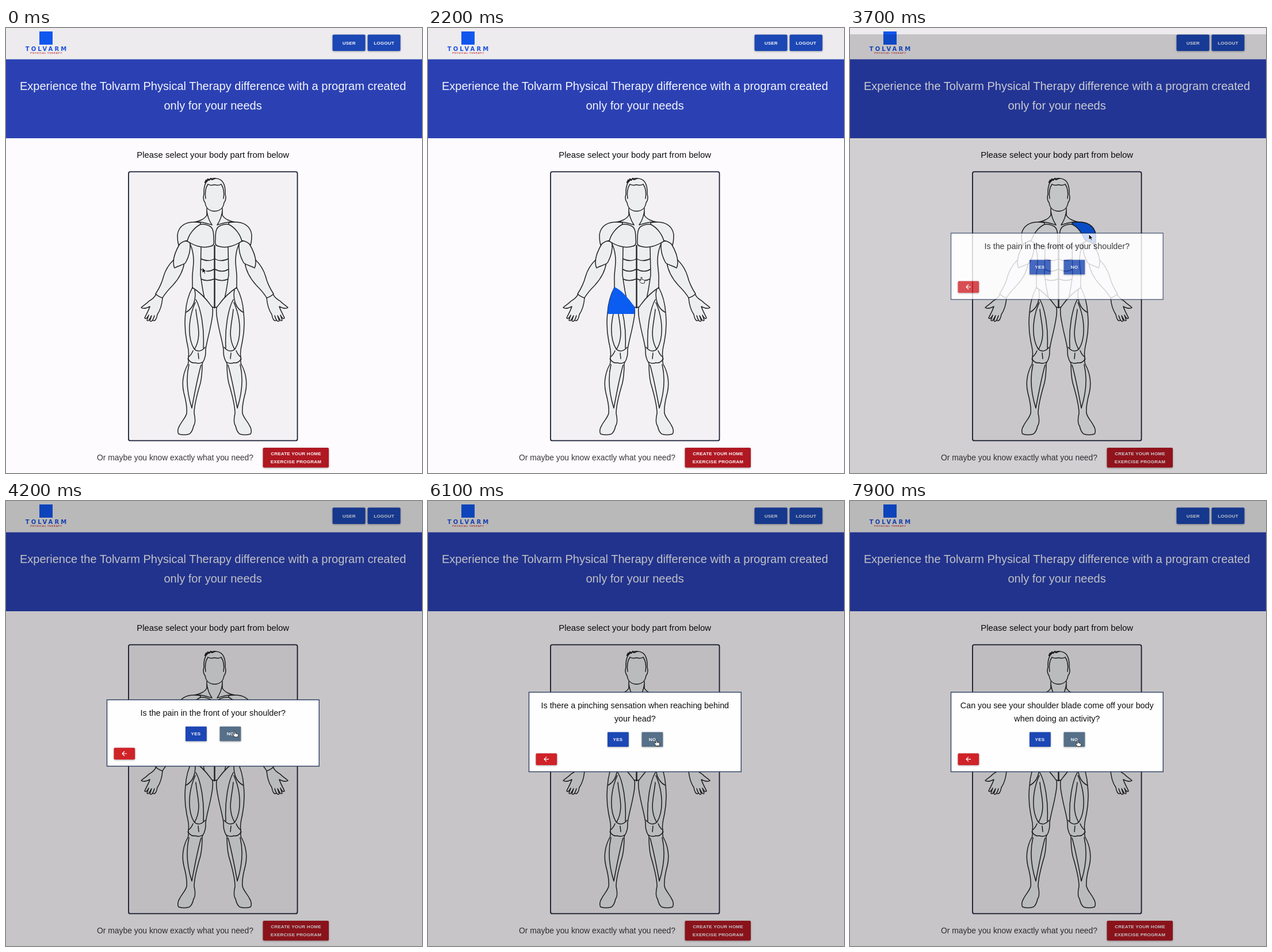
Recreate the animation shown at these times as an HTML page. Size 723 by 775 pixels, loop 8 s.

```html
<!DOCTYPE html>
<html lang="en">
<head>
<meta charset="utf-8">
<title>Body part selection</title>
<style>
  html, body { margin: 0; width: 100%; height: 100%; overflow: hidden; background: #fdfbfe; }
  svg { display: block; width: 723px; height: 775px; }
  text { font-family: "Liberation Sans", Arial, sans-serif; text-anchor: middle; }
  .btn { filter: drop-shadow(0 1px 1.5px #0005); }
  .cap { font-size: 8px; font-weight: bold; letter-spacing: .25px; fill: #f7f7fb; }
  .line { fill: none; }
  .bare { stroke: none; }
</style>
</head>
<body>
<svg viewBox="0 0 723 775">
  <defs>
    <g id="half">
      <path class="bare" d="M330 338H363V487L324 452 326 405 320 376Z"/>
      <!-- neck -->
      <path class="bare" d="M349 312V326C345 334 335 337 328 338L363 350V312Z"/>
      <path class="line" d="M349 314V326C345 333 335 337 327 338M349 318C350 329 354 337 358 343M327 338C340 337 348 340 358 343"/>
      <!-- hand and forearm -->
      <path d="M261 463C258 471 253 472 248 476 244 481 238 483 235 487 239 490 246 487 250 485 248 492 243 500 241 505 243 508 246 504 248 500L245 509C248 512 250 506 253 501L250 510C253 513 256 508 258 501L255 509C259 512 262 506 263 499 267 493 271 484 272 470Z"/>
      <path d="M291 404C283 412 277 422 274 432 271 444 266 454 260 463 264 467 268 469 272 470 276 463 282 456 290 448 300 437 308 424 310 408Z"/>
      <!-- upper arm, shoulder, chest -->
      <path d="M302 376C296 386 291 398 291 408 291 413 292 416 293 418 299 414 307 413 312 409 318 398 321 386 320 375 315 369 308 370 302 376Z"/>
      <path d="M338 339C312 335 300 345 298 360 298 368 298 372 300 378 306 372 310 371 316 370 317 360 327 350 338 342Z"/>
      <path d="M338 342C326 348 318 360 315 371 325 378 341 385 356 380 361 379 362 376 361 368 361 356 360 348 354 345 348 342 343 341 338 342Z"/>
      <!-- trunk -->
      <path class="line" d="M320 376C324 385 326 395 326 405 326 418 323 428 324 440V453M339 382 338 430C341 450 343 466 346 473M339 402C346 406 356 406 362 402M338 420C346 425 355 424 362 420M339 437C346 441 355 440 362 437"/>
      <!-- leg -->
      <path d="M324 452C318 463 313 480 312 496 310 515 311 530 314 545 316 556 319 563 317 573 317 578 318 582 316 586 308 600 305 618 309 635 313 650 315 662 314 671 312 679 306 684 302 692 298 698 298 704 300 707 306 709 313 709 319 707 324 703 325 698 326 693 330 688 329 680 327 671 327 655 333 635 338 618 341 605 341 595 341 584 347 575 347 568 347 560 349 545 354 530 357 512 359 503 360 495 359 487 354 481 346 466 324 452Z"/>
      <path class="line" d="M359 486 363 487M328 456C331 472 326 488 313 495M330 473C338 487 345 520 343 557M329 478C318 502 314 538 327 559M330 490C332 515 341 535 328 559M327 559C333 565 340 563 346 556M325 562C323 567 320 571 317 573M334 566 335 576M316 576C320 582 325 584 329 583 334 585 338 584 341 582M318 586C312 612 316 640 323 662M339 587C332 612 327 640 323 662"/>
      <!-- head -->
      <path class="bare" d="M363 262C350 261 342 270 343 290 342 294 343 301 346 304 347 312 352 319 363 319Z"/>
      <path class="line" d="M363 262C350 261 343 270 344 290 342 294 343 301 346 304 347 312 352 319 363 319M347 297C345 285 347 278 351 272 355 275 359 274 363 273"/>
    </g>
    <g id="arrow">
      <path d="M0 0V10L2.5 7.8 4.2 11.2 5.9 10.4 4.3 7.2H7.3Z" fill="#111" stroke="#fff" stroke-width=".9"/>
    </g>
    <g id="hand">
      <path d="M-2 0V-4C-2-5.5 0-5.5 0-4V-1L3.5 0C5 .4 5 1.5 4.6 3L4 5.5H-1.5L-4.5 1.5C-5-.2-3-.5-2 1Z" fill="#fff" stroke="#222" stroke-width="1"/>
    </g>
  </defs>

  <rect width="723" height="775" fill="#fdfbfe"/>
  <rect width="723" height="54.5" fill="#edebed"/>
  <rect y="54.5" width="723" height="137.5" fill="#2b41b3"/>

  <rect x="58" y="6" width="23" height="23" fill="#1157ee"/>
  <text x="71" y="39.5" font-size="10" font-weight="bold" letter-spacing="3.1" fill="#1c52dc" style="font-family:'DejaVu Sans',sans-serif">TOLVARM</text>
  <text x="70" y="44.7" font-size="4.4" font-weight="bold" letter-spacing=".7" fill="#c43a3c">PHYSICAL THERAPY</text>

  <g class="btn" fill="#1c47b4">
    <rect x="567.5" y="11.5" width="57" height="28.5" rx="2"/>
    <rect x="628.5" y="11.5" width="57" height="28.5" rx="2"/>
    <rect x="446.5" y="731" width="114.5" height="34.5" rx="2" fill="#b01822"/>
  </g>
  <g class="cap">
    <text x="596.3" y="28.8">USER</text>
    <text x="657" y="28.8">LOGOUT</text>
    <text x="504" y="744.4">CREATE YOUR HOME</text>
    <text x="504" y="758.2">EXERCISE PROGRAM</text>
  </g>

  <g font-size="20.05" fill="#f4f5fb">
    <text x="359.6" y="108">Experience the Tolvarm Physical Therapy difference with a program created</text>
    <text x="359.6" y="142">only for your needs</text>
  </g>
  <text x="359.7" y="226" font-size="14.9" fill="#0c0c0e">Please select your body part from below</text>
  <text x="294" y="753" font-size="13.86" fill="#37373b">Or maybe you know exactly what you need?</text>

  <rect x="213" y="250.3" width="293.5" height="468.4" rx="3" fill="#f3f1f4" stroke="#1b1e36" stroke-width="1.8"/>
  <g fill="#eceef0" stroke="#242426" stroke-width="1.5" stroke-linejoin="round" stroke-linecap="round">
    <use href="#half"/>
    <use href="#half" transform="translate(725) scale(-1 1)"/>
    <path class="line" d="M362.5 379V487" stroke-width="2.4"/>
    <path class="line" d="M346 269 348 265 349 267 351 263 353 265 356 262 358 264 363 262" stroke-width="2.4"/>
    <path id="hip" class="bare" fill="#0b5cf0" d="M324 451C337 457 345 468 350 474L360 487 359 498H312C313 480 318 463 324 451Z"/>
    <path id="shoulder" fill="#0b5cf0" d="M386 339C413 335 425 345 427 360V377C421 374 414 372 408 369 402 356 396 346 386 342Z"/>
  </g>

  <g id="dialog">
    <rect width="723" height="830" fill="#000" opacity=".215"/>
    <g id="card">
      <rect id="paper" x="175.5" width="368.7" fill="#fffeff" stroke="#2d3f60" stroke-width="1.4"/>
      <g font-size="14.33" fill="#0e0e10">
        <text id="line1" x="359.8" y="28"/>
        <text id="line2" x="359.8" y="51"/>
      </g>
      <g id="controls">
        <g class="btn">
          <rect x="312" y="46.5" width="36.8" height="25.5" rx="1" fill="#1c47b4"/>
          <rect id="no" x="371.5" y="46.5" width="36.8" height="25.5" rx="1"/>
          <rect x="187.5" y="83.5" width="36.7" height="20.5" rx="2" fill="#cf2328"/>
        </g>
        <g class="cap">
          <text x="330" y="61.9">YES</text>
          <text x="390" y="61.9">NO</text>
        </g>
        <path class="line" d="M210 93.7H202M206 89.7 202 93.7 206 97.7" stroke="#fff" stroke-width="1.2"/>
      </g>
    </g>
  </g>
  <use id="cursor"/>
</svg>

<script>
const LOOP = 8000;
const $ = id => document.getElementById(id);
const set = (id, attrs) => {
  for (const k in attrs) $(id).setAttribute(k, attrs[k]);
};
const show = (id, on) => set(id, { visibility: on ? "visible" : "hidden" });

// Keys: time, then values
const pointer = [
  [0, 341, 417], [500, 341, 417], [1100, 333, 475], [1800, 338, 470],
  [2200, 372, 439], [2800, 410, 362], [3100, 415, 359], [3800, 415, 359],
  [4300, 397, 411], [5000, 398, 410], [5500, 398, 420], [6100, 398, 421], [7900, 397, 422]
];
const entry = [[3500, 0, 50], [3600, .3, 42], [3700, .8, 11], [3800, 1, 0]];
const questions = [
  [0, "Is the pain in the front of your shoulder?"],
  [4600, "Is there a pinching sensation when reaching behind", "your head?"],
  [6300, "Can you see your shoulder blade come off your body", "when doing an activity?"]
];

function track(keys, t, ease = u => u) {
  const i = keys.findIndex(k => k[0] > t);
  if (i === 0) return keys[0].slice(1);
  if (i < 0) return keys[keys.length - 1].slice(1);
  const a = keys[i - 1], b = keys[i];
  const u = ease((t - a[0]) / (b[0] - a[0]));
  return a.slice(1).map((v, j) => v + (b[j + 1] - v) * u);
}

function draw(t) {
  show("hip", t >= 900 && t < 2300);
  show("shoulder", t >= 2600 && t < 3800);

  const [alpha, drop] = track(entry, t);
  set("dialog", { opacity: alpha, transform: `translate(0 ${drop})` });

  const [, first, second = ""] = questions.filter(q => q[0] <= t).pop();
  const extra = second ? 23 : 0;
  $("line1").textContent = first;
  $("line2").textContent = second;
  set("card", { transform: `translate(0 ${second ? 333 : 346.3})` });
  set("paper", { height: 115.5 + extra });
  set("controls", { transform: `translate(0 ${extra})` });

  const overNo = t >= 4200;
  set("no", { fill: overNo ? "#557088" : "#1c47b4" });
  const [x, y] = track(pointer, t, u => u * u * (3 - 2 * u));
  const hand = overNo || t >= 900 && t < 3500;
  set("cursor", { href: hand ? "#hand" : "#arrow", transform: `translate(${x} ${y})` });
}

function tick() {
  const t = performance.now() % LOOP;
  draw(Math.floor(t / 100) * 100);
  requestAnimationFrame(tick);
}
tick();
</script>
</body>
</html>
```
